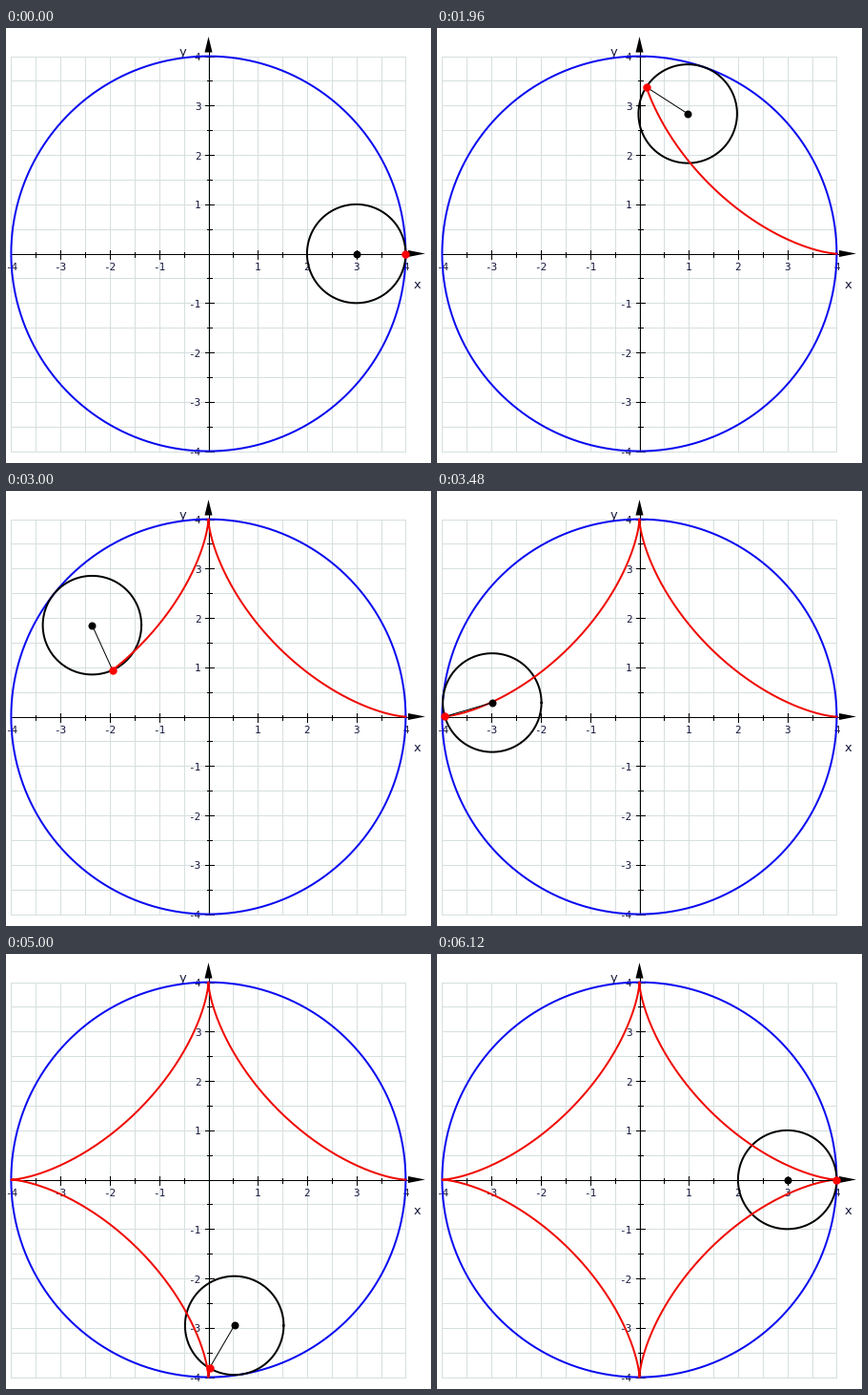
A matplotlib script that plays this animation: 446 by 456 pixels, repeating every 8.12 s.

```python
import numpy as np
import matplotlib.pyplot as plt
from matplotlib.animation import FuncAnimation

W, H, DPI = 446, 456, 64
PX = 72 / DPI                      # points per pixel
OX, OY, UNIT = 212.4, 236.6, 51.75
STEP_MS, HOLD_MS, LOOP_MS, TICK_MS = 80, 1000, 8120, 40
STEPS = 65
BLUE, RED, INK, GRID = "#0808f0", "#f00800", "#14143c", "#d6dfdf"

fig = plt.figure(figsize=(W / DPI, H / DPI), dpi=DPI, facecolor="white")
ax = fig.add_axes([0, 0, 1, 1])
ax.set_xlim(0, W)
ax.set_ylim(H, 0)
ax.axis("off")


def sx(x):
    return OX + UNIT * np.asarray(x)


def sy(y):
    return OY - UNIT * np.asarray(y)


def stroke(x, y, color, width, z, **kw):
    return ax.plot(x, y, color=color, lw=width * PX, zorder=z, **kw)[0]


def hair(x0, y0, x1, y1, color="black", z=2):
    stroke([x0, x1], [y0, y1], color, 1, z, antialiased=False,
           solid_capstyle="butt")


def label(x, y, s, ha="center", size=11, font="DejaVu Sans Mono"):
    ax.text(x, y, s, ha=ha, va="center", fontsize=size * PX, family=font,
            color=INK, zorder=3)


def draw_grid():
    for v in np.arange(-4, 4.1, 0.5):
        hair(sx(v), sy(4), sx(v), sy(-4), GRID, 1)
        hair(sx(-4), sy(v), sx(4), sy(v), GRID, 1)


def draw_axes():
    hair(5, 236.5, 430, 236.5)
    hair(212.5, 443, 212.5, 18)
    ax.fill([440, 422, 422], [236.5, 233, 240], color="black", lw=0, zorder=2)
    ax.fill([212.5, 208.5, 216.5], [9, 25.5, 25.5], color="black", lw=0,
            zorder=2)
    for v in np.arange(-4, 4.1, 0.5):
        if v == 0:
            continue
        whole = v == int(v)
        r = 4 if whole else 2
        hair(sx(v), 236.5 - r, sx(v), 236.5 + r + 1)
        hair(212.5 - r, sy(v), 212.5 + r + 1, sy(v))
        if whole:
            label(sx(v), 251, f"{v:.0f}")
            label(204.5, sy(v) + 1.5, f"{v:.0f}", ha="right")
    label(431, 269.5, "x", size=13, font="DejaVu Sans")
    label(185.5, 25, "y", size=13, font="DejaVu Sans")


draw_grid()
draw_axes()

ring = np.linspace(0, 2 * np.pi, 361)
stroke(sx(4 * np.cos(ring)), sy(4 * np.sin(ring)), BLUE, 2, 4)
wheel = stroke([], [], "black", 2, 5)
trail = stroke([], [], RED, 2, 6)
arm = stroke([], [], "black", 1, 7)
hub = stroke([], [], "black", 0, 8, marker="o", ms=8 * PX, mew=0)
pen = stroke([], [], "red", 0, 9, marker="o", ms=8.4 * PX, mew=0)


def roll_angle(step):
    # steady roll that speeds up slightly on the last stretch
    return np.radians(np.interp(step, [0, 40, 51, STEPS],
                                [0, 218.2, 280.1, 360]))


def astroid(t):
    return 3 * np.cos(t) + np.cos(3 * t), 3 * np.sin(t) - np.sin(3 * t)


def update(i):
    step = np.clip((i * TICK_MS - HOLD_MS) // STEP_MS + 1, 0, STEPS)
    t = roll_angle(step)
    cx, cy = 3 * np.cos(t), 3 * np.sin(t)
    px, py = astroid(t)
    tx, ty = astroid(np.linspace(0, t, 300))
    wheel.set_data(sx(cx + np.cos(ring)), sy(cy + np.sin(ring)))
    trail.set_data(sx(tx), sy(ty))
    arm.set_data(sx([cx, px]), sy([cy, py]))
    hub.set_data([sx(cx)], [sy(cy)])
    pen.set_data([sx(px)], [sy(py)])
    return wheel, trail, arm, hub, pen


anim = FuncAnimation(fig, update, frames=LOOP_MS // TICK_MS,
                     interval=TICK_MS, init_func=lambda: update(0),
                     repeat=True, repeat_delay=0, blit=False)
plt.show()
```
